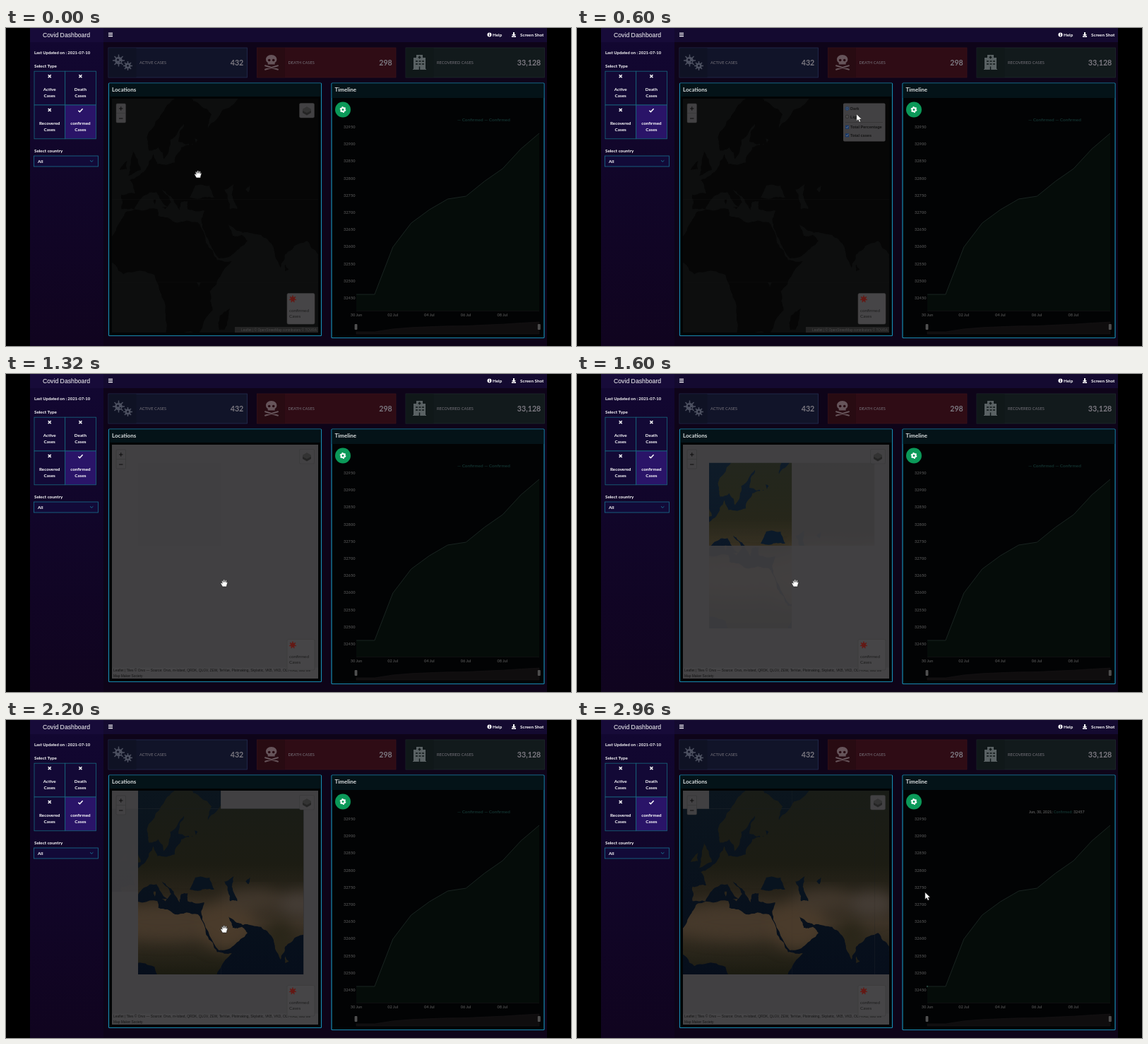
An HTML page for the animation above (3 s loop, 800 by 450 pixels).

```html
<!DOCTYPE html>
<html lang="en">
<head>
<meta charset="utf-8">
<title>Covid Dashboard</title>
<style>
html, body { margin: 0; width: 100%; height: 100%; overflow: hidden; background: #000; }
svg { display: block; width: 800px; height: 450px; }
text { font: 6.3px Lato, "Open Sans", sans-serif; fill: #fff; white-space: pre; }
.b { font-weight: 700; }
.mid { text-anchor: middle; }
.end { text-anchor: end; }
.title { font: 8.7px "Liberation Sans", Arial, sans-serif; }
.head { font-size: 8px; font-weight: 700; fill: #dcdfe0; }
.label { font-size: 5.7px; fill: #77747c; }
.num { font-size: 10.7px; font-weight: 700; fill: #7b7880; }
.tick { font-size: 5.7px; font-weight: 700; fill: #4b4b4b; }
.key { font-size: 5.4px; font-weight: 700; fill: #565656; }
.credit { font: 4.85px "Liberation Sans", Arial, sans-serif; fill: #151515; }
.opt { font: 700 5.6px "Liberation Sans", Arial, sans-serif; fill: #151515; }
.ink { fill: #1c1c1c; }
.teal { fill: #12312e; }
</style>
</head>
<body>
<svg viewBox="0 0 800 450">
  <defs>
    <linearGradient id="side" x2="0" y2="1">
      <stop stop-color="#120731"/><stop offset="1" stop-color="#10041f"/>
    </linearGradient>
    <linearGradient id="ground" gradientUnits="userSpaceOnUse" x1="0" y1="100" x2="0" y2="360">
      <stop stop-color="#191c17"/><stop offset=".4" stop-color="#1c1c13"/>
      <stop offset=".56" stop-color="#29241a"/><stop offset=".72" stop-color="#3c3226"/>
      <stop offset="1" stop-color="#1b1b11"/>
    </linearGradient>
    <linearGradient id="sea" gradientUnits="userSpaceOnUse" x1="0" y1="100" x2="0" y2="360">
      <stop stop-color="#0b151e"/><stop offset="1" stop-color="#060e1b"/>
    </linearGradient>
    <filter id="soft" color-interpolation-filters="sRGB"><feGaussianBlur stdDeviation="10"/></filter>
    <clipPath id="frame"><path d="M150 100H442V431H150Z"/></clipPath>
    <clipPath id="coast"><path class="land"/></clipPath>
    <g id="photo">
      <path fill="url(#sea)" d="M60 0H550V365H60Z"/>
      <g clip-path="url(#coast)">
        <path fill="url(#ground)" d="M60 0H550V365H60Z"/>
        <g filter="url(#soft)">
          <ellipse cx="225" cy="286" rx="95" ry="25" fill="#46392b"/>
          <ellipse cx="312" cy="291" rx="40" ry="34" fill="#4a3b2b"/>
          <ellipse cx="350" cy="255" rx="45" ry="16" fill="#41372c"/>
          <ellipse cx="418" cy="260" rx="32" ry="18" fill="#453d36"/>
          <ellipse cx="388" cy="308" rx="20" ry="26" fill="#2a2619"/>
        </g>
      </g>
      <path class="lakes" fill="#08131f"/>
    </g>
  </defs>

  <path fill="#0e0419" d="M34 0H766V450H34Z"/>
  <path fill="url(#side)" d="M34 20H138V450H34Z"/>
  <path fill="#140a30" d="M34 0H766V20H34Z"/>
  <path fill="#170b39" d="M34 0H138V20H34Z"/>
  <text class="title" x="52" y="13">Covid Dashboard</text>
  <path stroke="#fff" stroke-width="1.2" d="M145 7.3h6M145 9.5h6M145 11.7h6"/>
  <circle cx="684.5" cy="9.5" r="3" fill="#fff"/>
  <path stroke="#140a30" d="M684.5 7.3v1M684.5 9v2.4"/>
  <text class="b" x="689" y="12">Help</text>
  <path fill="#fff" d="M718 6h2v3h2l-3 3-3-3h2zM716 11.3h1.5l1.5 1.2 1.5-1.2h1.5v1.6h-6z"/>
  <text class="b" x="728" y="12">Screen Shot</text>

  <text class="b" x="40" y="37.3" style="font-size:5.9px">Last Updated on : 2021-07-10</text>
  <text class="b" x="40" y="56.3">Select Type</text>
  <g id="types"></g>
  <text class="b" x="40" y="176.2">Select country</text>
  <rect x="39.5" y="181" width="91" height="15" fill="#120a38" stroke="#18718f" stroke-width=".8"/>
  <text class="b" x="45" y="190.8">All</text>
  <path fill="none" stroke="#18718f" d="M119 187.3l2.2 2 2.2-2"/>

  <g id="cards"></g>
  <g id="virus" fill="#4c5060"></g>
  <path fill="#66545a" d="M375.7 38c-4.8 0-7.700 3-7.700 6.500 0 2 1 3.500 2.700 4.500v2.500h10v-2.500c1.700-1 2.700-2.500 2.700-4.500 0-3.500-2.900-6.500-7.700-6.500z"/>
  <path stroke="#66545a" stroke-width="2" stroke-linecap="round" d="M367 53.300l18 5.500M385 53.300l-18 5.500"/>
  <g fill="#280b12"><circle cx="372.700" cy="45.500" r="1.800"/><circle cx="378.700" cy="45.500" r="1.800"/></g>
  <path fill="#5a6264" d="M577 42h4v-4h9v4h4v16h1v1h-19v-1h1z"/>
  <path stroke="#101819" stroke-width="1.4" d="M585.500 39.500v4M583.500 41.500h4M580 47h3M584.500 47h3M589 47h3M580 51h3M584.500 51h3M589 51h3M585.500 54.500v4.500"/>

  <g fill="#020304" stroke="#178ab0" stroke-width="1.2">
    <rect x="145.500" y="78" width="301" height="357.500" rx="1"/>
    <rect x="461" y="78" width="301" height="360.500" rx="1"/>
  </g>
  <path fill="#041318" d="M146.100 78.600H445.900V97H146.100ZM461.600 78.600H761.400V99H461.600Z"/>
  <text class="head" x="150" y="89.500">Locations</text>
  <text class="head" x="465.500" y="89.500">Timeline</text>

  <g clip-path="url(#frame)">
    <g id="night">
      <path fill="#0d0e0e" d="M150 100H442V431H150Z"/>
      <path class="land" fill="#060606"/>
      <path class="lakes" fill="#0d0e0e"/>
      <path stroke="#181818" stroke-width=".5" opacity=".6" d="M150 242.500H442M150 360H442"/>
    </g>
    <g id="day">
      <path fill="#414042" d="M150 100H442V431H150Z"/>
      <g id="tiles"></g>
    </g>
  </g>
  <g id="nightCredit">
    <path fill="#242424" d="M324 423H442V431H324Z"/>
    <text class="credit end" x="440" y="428.500" style="fill:#4c4c4c">Leaflet | © OpenStreetMap contributors © TOVRA</text>
  </g>
  <g id="dayCredit">
    <path fill="#454446" d="M150 415.500H442V431H150Z"/>
    <text class="credit" x="152" y="421.300">Leaflet | Tiles © Orvo — Source: Orvo, m-lobed, QRDK, QLGV, ZEW, TerVue, Plotmaking, Skylattic, VKB, VKD, OLT-KRB, and the</text>
    <text class="credit" x="152" y="428.600">Map Maker Society</text>
  </g>
  <rect x="156" y="107" width="13.500" height="27" rx="1.500" fill="#424143" stroke="#333" stroke-width=".5"/>
  <path stroke="#0c0c0c" d="M160 114h5.500M162.750 111.300v5.400M160 128h5.500"/>
  <path stroke="#333" stroke-width=".5" d="M156 120.500h13.500"/>
  <g id="button">
    <rect x="415.500" y="106.500" width="21" height="20.500" rx="1.800" fill="#424143" stroke="#363636" stroke-width=".5"/>
    <path fill="#252525" d="M420 117v3l6 3.500 6-3.500v-3z"/>
    <path fill="#333" d="M426 111.300l6 3.400v2.300l-6 3.300-6-3.300v-2.300z"/>
  </g>
  <g id="menu">
    <rect x="377" y="106.500" width="59.500" height="54" rx="1.800" fill="#424143"/>
    <path stroke="#303030" stroke-width=".6" d="M380 133.500h53"/>
    <circle cx="382.500" cy="114" r="2.400" fill="#4d5967" stroke="#183c70" stroke-width=".9"/>
    <circle cx="382.500" cy="114" r="1.100" fill="#183c70"/>
    <circle cx="382.500" cy="125.500" r="2.300" fill="#494949" stroke="#262626" stroke-width=".6"/>
    <path fill="#17396b" d="M380 137.700h5v5h-5zM380 149.200h5v5h-5z"/>
    <path fill="none" stroke="#888" stroke-width=".8" d="M381 140.300l1.200 1.200 2-2.600M381 151.800l1.200 1.200 2-2.600"/>
    <text class="opt" x="387" y="116.300">Dark</text>
    <text class="opt" x="387" y="127.800">Light</text>
    <text class="opt" x="387" y="142.300">Total Percentage</text>
    <text class="opt" x="387" y="153.800">Total cases</text>
  </g>
  <rect x="398" y="375.500" width="39" height="43.500" rx="2" fill="#464547" stroke="#393939" stroke-width=".6"/>
  <g id="germ" fill="#641a16"></g>
  <text class="ink" x="401" y="402">confirmed</text>
  <text class="ink" x="401" y="410">Cases</text>

  <circle cx="477" cy="115.500" r="11" fill="#0b9959"/>
  <circle cx="477" cy="115.500" r="2.500" fill="none" stroke="#fff" stroke-width="2"/>
  <circle cx="477" cy="115.500" r="3.800" fill="none" stroke="#fff" stroke-width="1.200" stroke-dasharray="1.990"/>
  <g id="chart"></g>
  <text id="keyPlain" class="key teal" x="639" y="132" style="font-size:6.400px">— Confirmed — Confirmed</text>
  <g id="keyHover">
    <text class="key" x="640" y="132">Jun, 30, 2021: <tspan class="teal">Confirmed:</tspan> 32457</text>
    <circle cx="496" cy="377" r="1.200" fill="#24423a"/>
  </g>

  <path id="hand" fill="#fff" stroke="#111" stroke-width=".6" stroke-linejoin="round" d="M-2.500 5L-5 .5Q-5.500-1.500-3.500-.5L-2.800 .4-3.600-3Q-3.400-4.800-2-3.600L-1.300-1.500-1.200-4.500Q0-5.800.7-4.500L.9-1.500 1.500-4Q2.700-5 3.200-3.500L3-.8 3.700-2.200Q5-2.600 4.800-1L3.500 3.500V5Z"/>
  <path id="arrow" fill="#fff" stroke="#111" stroke-width=".5" d="M-1.200-5.200V4.800L1.200 2.600 2.700 6.200 4.600 5.400 3.100 2H6.200Z"/>
</svg>
<script>
const $ = id => document.getElementById(id);
const range = n => [...Array(n).keys()];
const clamp = v => Math.max(0, Math.min(1, v));
const fill = (id, list, make) => $(id).innerHTML = list.map(make).join('');

// Key points as longitude, latitude; roughen() adds the small bays between them
const asia = [27,41, 27,70, 40,67, 38,64, 46,68, 70,73, 100,75, 100,8, 98,15, 92,22, 86,20, 80,15, 77.5,8, 73,20,
  67,25, 57,26, 49,30, 51.5,24.5, 56.5,25, 59.5,22, 52,15.5, 44,13, 35,28.5, 34.5,31.5, 36,36.5, 27,37];
const europe = [30,41, 23.5,40, 22.5,36.5, 19.4,41, 13,45, 18,40, 16,38, 10,44, 3,42.5, -2,37, -9,37, -9,43,
  -1.5,43.5, -4.5,48.5, 4,52, 8.3,57, 10.5,54, 20,54.5, 23.5,59, 30,59.8, 22,60.5, 25,65, 17.5,61, 14,55.5,
  11,59, 6,58, 5,62, 15,68.5, 25,71, 30,70];
const africa = [32.5,31, 20,31, 11,34, 10.5,37, -6,36, -10,31, -17,21, -16.5,14, -8,4.5, 4,6, 9,4, 13,-8,
  15,-27, 33,-27, 40.5,-15, 39,-5, 51,11.5, 43,12, 37,21];
const islands = [[44,-25, 47,-25, 50,-14, 44.5,-18], [-5.5,50, 1.5,52, -3,58.5, -4,54], [-10,52, -6,52.3, -6,55],
  [80,9.7, 82,7, 80,6], [12.5,38, 15.5,38, 15,37], [8.3,41, 9.7,41, 9,39]];
const lakes = [[28,42, 31,46.5, 39,46.5, 41.5,42, 35,42], [47,45, 52,47, 51,43, 54,37, 50,37, 49,41],
  [58.5,45, 61,46.5, 60,44], [30.5,61.5, 32.5,61, 31.5,60], [32,0, 34,0, 33,-2.5]];

const TILE = 117.1, X0 = 187, Y0 = 360;
const project = (lon, lat) => [X0 + lon * TILE / 45,
  Y0 - TILE * 4 / Math.PI * Math.log(Math.tan(Math.PI / 4 + lat * Math.PI / 360))];
let seed = 7;
const random = () => (seed = seed * 16807 % 2147483647) / 2147483647;
const roughen = points => points.flatMap(([x, y], i) => {
  const [u, v] = points[(i + 1) % points.length];
  const k = (random() - .5) * Math.min(.25, 6 / Math.hypot(u - x, v - y));
  return [[x, y], [(x + u) / 2 + (v - y) * k, (y + v) / 2 - (u - x) * k]];
});
const outline = p => {
  let points = range(p.length / 2).map(i => project(p[2 * i], p[2 * i + 1]));
  for (const _ of range(3)) points = roughen(points);
  return 'M' + points.map(q => q.map(v => v.toFixed(1))).join('L') + 'Z';
};
const draw = (name, shapes) => {
  const d = shapes.map(outline).join('');
  document.querySelectorAll('.' + name).forEach(e => e.setAttribute('d', d));
};
draw('land', [asia, europe, africa, ...islands]);
draw('lakes', lakes);

// Load time and the tiles (column, row) that appear then
const waves = { 1320: '11', 1578: '12 21', 1740: '22', 1900: '10', 2190: '01', 2250: '31 20 30 02', 2540: '32' };
const tiles = Object.entries(waves).flatMap(([start, ids]) => ids.split(' ').map(id => ({ id: 'tile' + id, start })));
fill('tiles', tiles, ({ id }) => {
  const [c, r] = id.slice(-2);
  const box = `<rect x="${X0 + (c - 1) * TILE}" y="${Y0 + (r - 3) * TILE}" width="${TILE}" height="${TILE}"/>`;
  return `<clipPath id="cut${id}">${box}</clipPath><g id="${id}" clip-path="url(#cut${id})"><use href="#photo"/></g>`;
});

fill('types', ['Active', 'Death', 'Recovered', 'confirmed'], (name, i) => {
  const x = 40 + i % 2 * 43.7, y = 61.2 + (i >> 1) * 47.8, mid = x + 21.7, on = i == 3;
  const mark = on ? `M${mid - 3} ${y + 7.7}l2 2 4.200-4.400` : `M${mid - 2} ${y + 5}l4 4M${mid + 2} ${y + 5}l-4 4`;
  return `<rect x="${x}" y="${y}" width="43.700" height="47.800" fill="${on ? '#2a1468' : '#130936'}" stroke="#17687f" stroke-width=".8"/>
    <path d="${mark}" fill="none" stroke="#fff" stroke-width="1.500"/>
    <text class="b mid" x="${mid}" y="${y + 28}">${name}</text><text class="b mid" x="${mid}" y="${y + 37}">Cases</text>`;
});

fill('cards', [
  ['ACTIVE', '432', '#111429', '#0f1224', '#232d50'],
  ['DEATH', '298', '#2f0c15', '#280b12', '#3a121b'],
  ['RECOVERED', '33,128', '#121a1c', '#101819', '#1d282b']
], ([name, n, body, dark, edge], i) => {
  const x = 145 + i * 210.5;
  return `<rect x="${x}" y="28" width="196.500" height="42" fill="${body}" stroke="${edge}" stroke-width=".8"/>
    <rect x="${x + .4}" y="28.400" width="39" height="41.200" fill="${dark}"/>
    <text class="label" x="${x + 44}" y="51.200">${name} CASES</text>
    <text class="num end" x="${x + 191.3}" y="53">${n}</text>`;
});

const spiky = (x, y, r, rays) => `<circle cx="${x}" cy="${y}" r="${r * .62}"/>` + range(rays).map(i =>
  `<path d="M-1 0L-.7-${r}H.7L1 0Z" transform="translate(${x} ${y}) rotate(${i * 360 / rays})"/>`).join('');
$('virus').innerHTML = spiky(159.5, 46, 8.5, 8) + spiky(172.5, 53.5, 6.5, 8) +
  '<g fill="#0f1224"><circle cx="158.500" cy="45" r="1.600"/><circle cx="162" cy="48" r="1"/><circle cx="172.500" cy="53.500" r="1.400"/></g>';
$('germ').innerHTML = spiky(406, 383.5, 5, 7);

// Timeline and its range strip
const curve = [377, 377, 310, 276, 257, 242, 238, 217, 199, 171, 149];
const plot = scale => curve.map((y, i) => `${496 + i * 25.9} ${scale(y)}`).join('L');
const line = plot(y => y), strip = plot(y => 430 - (377 - y) * .061);
$('chart').innerHTML =
  `<path fill="#050c09" d="M${line}V400H496Z"/><path fill="none" stroke="#1c2724" stroke-width=".9" d="M${line}"/>
   <path stroke="#161616" stroke-width=".6" d="M496 400.500H755"/>
   <path fill="#0f0d0e" stroke="#1c181a" stroke-width=".5" d="M${strip}V433H496Z"/>
   <path fill="#4a4a4a" stroke="#777" stroke-width=".5" d="M494 419.500h3v7h-3zM753.300 419.500h3v7h-3z"/>` +
  range(11).map(i => `<text class="tick end" x="494.500" y="${142 + i * 24.2}">${32950 - i * 50}</text>`).join('') +
  range(5).map(i => `<text class="tick mid" x="${496 + i * 51.7}" y="408">${i ? '0' + 2 * i + ' Jul' : '30 Jun'}</text>`).join('');

// Pointer path: time, x, y
const stops = [[0,272,207], [400,424,118], [600,397,127], [720,397,127], [960,373,131],
  [1320,309,296], [2500,309,296], [2960,494,249], [3000,494,249]];
const pointer = t => {
  const i = stops.findIndex(s => s[0] > t), [a, b] = [stops[i - 1], stops[i]];
  const k = (t - a[0]) / (b[0] - a[0]), e = k * k * (3 - 2 * k);
  return [a[1] + (b[1] - a[1]) * e, a[2] + (b[2] - a[2]) * e];
};
const show = (id, on) => $(id).style.display = on ? '' : 'none';

function frame(now) {
  const t = now % 3000, light = t >= 760, menu = t >= 400 && t < 860, hover = t >= 2840;
  show('night', !light);
  show('nightCredit', !light);
  show('day', light);
  show('dayCredit', light);
  show('menu', menu);
  show('button', !menu);
  show('keyPlain', !hover);
  show('keyHover', hover);
  for (const { id, start } of tiles) {
    show(id, t > start);
    $(id).style.opacity = clamp((t - start) / 200);
  }
  // The first tile arrives brighter and settles
  $('tile11').style.filter = `brightness(${1 + .35 * clamp((1850 - t) / 200)})`;

  const [x, y] = pointer(t), arrow = menu || x > 442;
  show('hand', !arrow);
  show('arrow', arrow);
  $(arrow ? 'arrow' : 'hand').setAttribute('transform', `translate(${x} ${y})`);
  requestAnimationFrame(frame);
}
requestAnimationFrame(frame);
</script>
</body>
</html>
```
